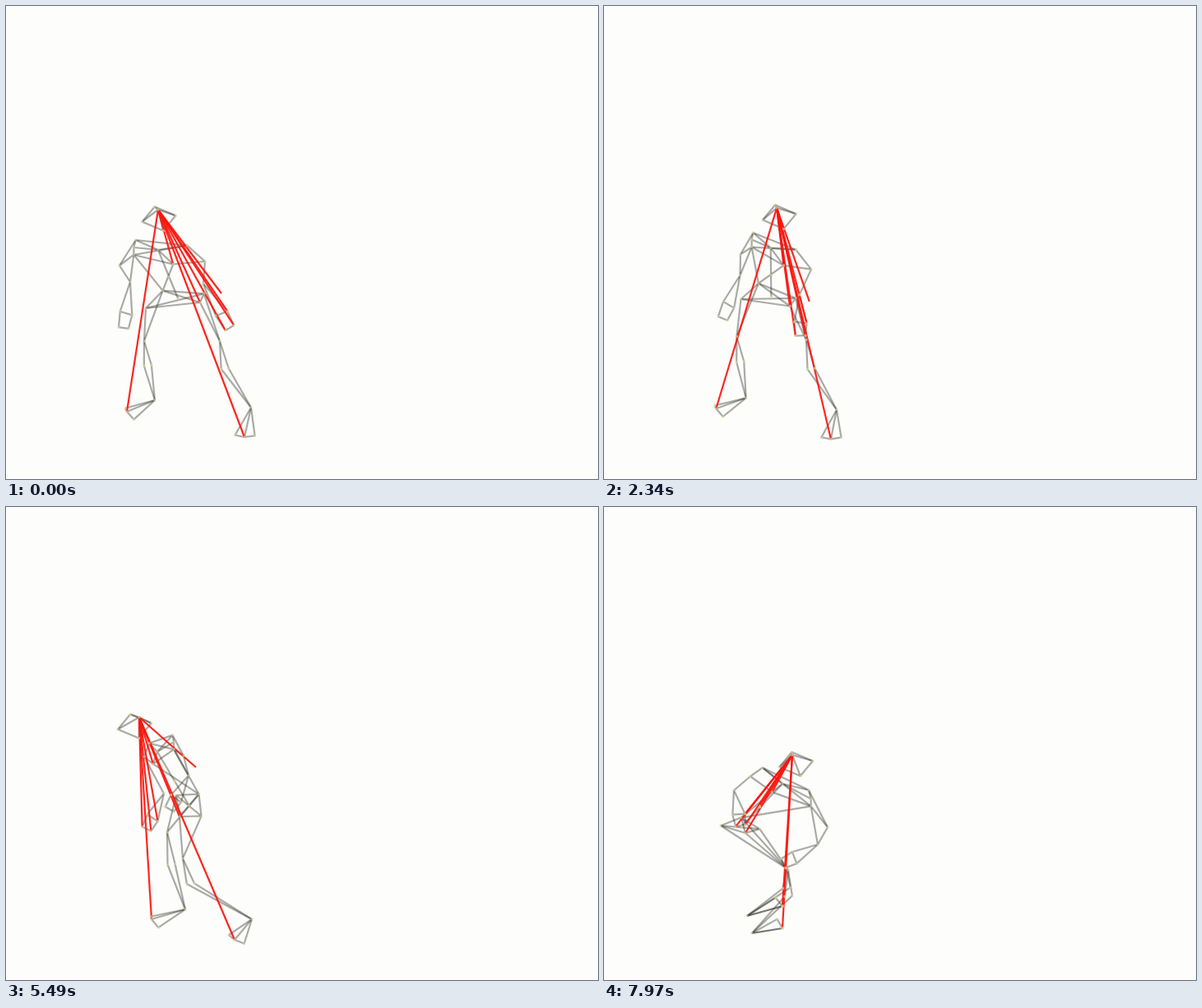
Recreate the animation shown at these times as an HTML page with a canvas. Size 720 by 576 pixels, loop 8000 ms.

```html
<!DOCTYPE html>
<html lang="en">
<head>
<meta charset="utf-8">
<title>Marker figure</title>
<style>
html, body { margin: 0; width: 100%; height: 100%; overflow: hidden; background: #fdfdfc; }
canvas { display: block; width: 720px; height: 576px; }
</style>
</head>
<body>
<canvas id="stage" width="720" height="576"></canvas>
<script>
const ctx = document.getElementById('stage').getContext('2d');
const LOOP = 8000, STEP = 45, HIP_Y = 350;

// Stance, shifted stance, turned aside, turned round, crouch.
const keyTimes = [0, 3600, 5490, 6525, 7965];
const body = {
  hub:       [[185, 248], [203, 243], [162, 256], [190, 250], [229, 302]],
  neck:      [[185, 297], [199, 293], [184, 298], [205, 300], [217, 337]],
  shoulderL: [[138, 316], [163, 301], [216, 303], [262, 300], [272, 390]],
  shoulderR: [[242, 311], [250, 320], [168, 304], [170, 305], [178, 328]],
  hipL:      [[170, 368], [167, 357], [207, 351], [243, 351], [142, 388]],
  hipR:      [[236, 361], [227, 366], [211, 377], [173, 355], [172, 397]]
};
const limbs = {
  elbowL: [[151, 336], [169, 324], [222, 327], [259, 321], [260, 411]],
  elbowR: [[240, 338], [237, 357], [192, 349], [168, 340], [158, 345]],
  handL:  [[143, 392], [148, 377], [199, 368], [224, 338], [218, 434]],
  handR:  [[272, 392], [231, 407], [171, 392], [137, 378], [166, 388]],
  tip:    [[262, 350], [246, 364], [231, 317], [220, 335], [190, 363]],
  kneeL:  [[168, 408], [164, 402], [196, 396], [236, 390], [222, 440]],
  kneeR:  [[260, 408], [246, 408], [215, 428], [170, 410], [224, 442]],
  ankleL: [[181, 480], [182, 481], [218, 490], [249, 497], [174, 498]],
  ankleR: [[298, 489], [291, 498], [299, 502], [241, 514], [180, 519]],
  toeL:   [[147, 494], [146, 494], [177, 502], [210, 481], [217, 486]],
  toeR:   [[290, 525], [288, 535], [278, 527], [194, 525], [217, 513]]
};

const pairs = chains => chains.flatMap(chain => {
  const names = chain.split(' ');
  return names.slice(1).map((name, i) => [names[i], name]);
});
const sideChains = [
  'shoulder elbow wristOut palmOut palmIn wristIn elbow', 'wristOut wristIn',
  'hip knee shinOut ankle toe soleOut ankle soleIn toe', 'rim knee shinIn ankle'
];
const bones = pairs([
  'head0 head1 head2 head3 head0', 'head2 hub head0', 'head1 hub head3',
  'topL topR shoulderR chest frontL', 'topR frontL innerL topL shoulderL frontL rimL chest',
  'topL neck back pelvis', 'innerL neck chest', 'neck topR', 'frontL elbowL',
  'rimL rimR hipR hipL rimL hipR', 'rimR hipL',
  ...['L', 'R'].flatMap(side => sideChains.map(chain => chain.replace(/\w+/g, name => name + side)))
]);
const rays = ['chest', 'tip', 'hipR', 'wristInR', 'palmInR', 'palmOutR', 'toeL', 'toeR']
  .map(name => ['hub', name]);

const smooth = u => u * u * (3 - 2 * u);
const swell = u => Math.sin(Math.PI * u) ** 2;
const mix = (a, b, u, dx = 0, dy = 0) => [a[0] + (b[0] - a[0]) * u + dx, a[1] + (b[1] - a[1]) * u + dy];
const add = (p, dx, dy) => mix(p, p, 0, dx, dy);

// Unit vector across the segment a-b.
function across(a, b) {
  const x = b[0] - a[0], y = b[1] - a[1], length = Math.hypot(x, y) || 1;
  return [y / length, -x / length];
}

function joints(time) {
  let i = keyTimes.length - 2;
  while (keyTimes[i] > time) i--;
  const u = Math.min(1, (time - keyTimes[i]) / (keyTimes[i + 1] - keyTimes[i]));
  const limbEase = i === 3 ? u ** 4 : smooth(u);
  const bodyEase = i === 0 ? 1 - (1 - u) ** 4 : limbEase;
  const sway = i === 0 ? Math.sin(Math.PI * (1 - (1 - u) ** 1.5)) : 0;
  const lift = i === 0 ? 0 : 8 * swell(u);
  const stride = i === 1 ? { L: -36 * swell(u), R: 28 * swell(u ** 3) } : {};

  const points = {};
  const place = (tracks, ease) => {
    for (const [name, track] of Object.entries(tracks)) {
      const p = mix(track[i], track[i + 1], ease);
      const reach = (p[1] - HIP_Y) / 140;
      const step = /ankle|toe/.test(name) ? stride[name.at(-1)] || 0 : 0;
      // The stance leans as a shear about the hips.
      points[name] = add(p, step - 16 * reach * sway, lift * Math.min(0, reach) - 6 * reach * sway);
    }
  };
  place(body, bodyEase);
  place(limbs, limbEase);
  return points;
}

function addHead(p) {
  const cx = p.hub[0] + 1 + 0.3 * (p.hub[0] - p.neck[0]), cy = p.hub[1] + 11;
  for (let k = 0; k < 4; k++) {
    const angle = k * Math.PI / 2 - 0.25;
    p['head' + k] = [cx + 21 * Math.cos(angle), cy + 15 * Math.sin(angle)];
  }
}

function addTorso(p) {
  p.topL = mix(p.neck, p.shoulderL, 0.58, 0, -23);
  p.innerL = mix(p.neck, p.shoulderL, 0.63, 0, -15);
  p.frontL = mix(p.neck, p.shoulderL, 0.63, 0, -6);
  p.topR = mix(p.neck, p.shoulderR, 0.62, 0, -14);
  p.chest = mix(p.neck, p.shoulderR, 0.32, 0, 13);

  const width = p.hipR[0] - p.hipL[0];
  const facing = width / 68, depth = 1 - Math.min(1, Math.abs(facing));
  p.rimL = add(p.hipL, 0.3 * width + 28 * depth, -22 * facing);
  p.rimR = add(p.hipR, 4 + 24 * depth, -11 * facing);
  p.pelvis = mix(mix(p.hipL, p.rimL, 0.5), mix(p.hipR, p.rimR, 0.5), 0.5);
  p.back = mix(p.neck, p.pelvis, 0.55);
}

function addLimbs(p, side) {
  const at = name => p[name + side];
  const elbow = at('elbow'), hand = at('hand'), knee = at('knee'), ankle = at('ankle'), toe = at('toe');
  const palm = across(elbow, hand), foot = across(ankle, toe);
  const offset = (point, v, size) => add(point, v[0] * size, v[1] * size);

  p['wristOut' + side] = offset(mix(elbow, hand, 0.66), palm, -7);
  p['wristIn' + side] = offset(mix(elbow, hand, 0.7), palm, 8);
  p['palmOut' + side] = offset(hand, palm, -6);
  p['palmIn' + side] = offset(hand, palm, 6);

  const bend = -0.35 * (ankle[0] - knee[0]) - 1;
  p['shinOut' + side] = mix(knee, ankle, 0.42, bend, 0);
  p['shinIn' + side] = mix(knee, ankle, 0.42, bend + 9, -1);

  const slope = Math.max(0, toe[1] - ankle[1]) / Math.hypot(toe[0] - ankle[0], toe[1] - ankle[1]);
  p['soleOut' + side] = offset(mix(toe, ankle, 0.12), foot, 12);
  p['soleIn' + side] = offset(toe, foot, -12 * slope);
}

function drawLines(points, lines, color, width) {
  ctx.strokeStyle = color;
  ctx.lineWidth = width;
  for (const [a, b] of lines) {
    ctx.beginPath();
    ctx.moveTo(...points[a]);
    ctx.lineTo(...points[b]);
    ctx.stroke();
  }
}

function draw(time) {
  const points = joints(Math.floor(time % LOOP / STEP) * STEP);
  addHead(points);
  addTorso(points);
  for (const side of ['L', 'R']) addLimbs(points, side);

  ctx.fillStyle = '#fdfdfc';
  ctx.fillRect(0, 0, 720, 576);
  drawLines(points, bones, 'rgba(45, 45, 35, .4)', 2.2);
  drawLines(points, rays, 'rgba(250, 22, 14, .92)', 2.2);
  ctx.fillStyle = 'rgba(215, 212, 160, .7)';
  for (const name of new Set(bones.flat())) {
    const [x, y] = points[name];
    ctx.fillRect(x - 1.5, y - 1.5, 3, 3);
  }
}

const start = performance.now();
function tick() {
  draw(performance.now() - start);
  requestAnimationFrame(tick);
}
tick();
</script>
</body>
</html>
```
